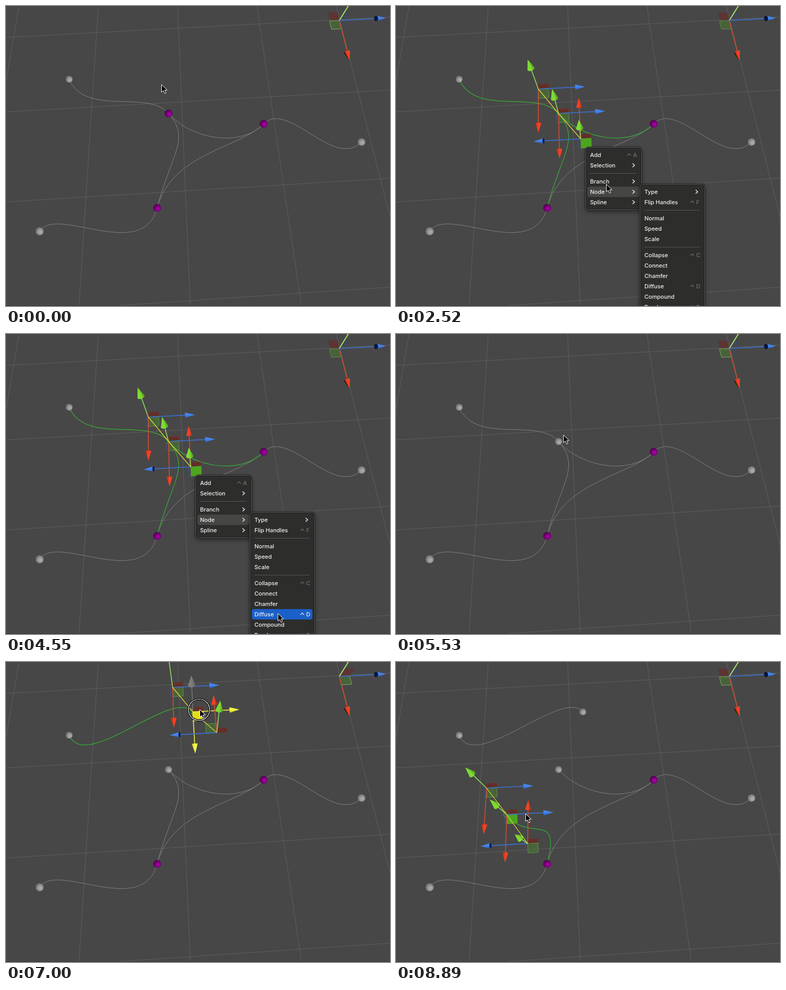
Recreate the animation shown at these times as an HTML page with a canvas. Size 742 by 578 pixels, loop 8960 ms.

```html
<!DOCTYPE html>
<html>
<head>
<meta charset="utf-8">
<style>
html, body { margin: 0; width: 100%; height: 100%; overflow: hidden; background: #474747; }
canvas { display: block; }
</style>
</head>
<body>
<canvas id="stage" width="742" height="578"></canvas>
<script>
const ctx = document.getElementById('stage').getContext('2d');
const LOOP = 8960;

// event times in ms
const SELECT = 770, MENU = 1050, SUBMENU = 2240, SPLIT = 4620;
const PICK1 = 5810, DRAG1 = 6300, STOP1 = 7000, DROP1 = 7070;
const PICK2 = 7630, DRAG2 = 7980, STOP2 = 8610, DROP2 = 8750;

// cursor stops: arrival time, x, y; a move takes at most GLIDE ms
const GLIDE = 490;
const STOPS = [
  [0, 300, 151], [210, 267, 151], [630, 367, 263], [1750, 406, 343], [3010, 500, 360],
  [3430, 530, 438], [3850, 526, 526], [4200, 525, 538], [5040, 374, 201], [5250, 341, 160],
  [5670, 317, 206], [6300, 327, 202], [6510, 333, 194], [STOP1, 374, 91],
  [7560, 317, 209], [7910, 319, 223], [STOP2, 219, 310], [8890, 250, 292]
];

// cone light, cone dark, line
const RED = ['#f64222', '#b32c14', '#cf4a30'];
const GREEN = ['#80da33', '#4f9a1b', '#8fd660'];
const BLUE = ['#4485ec', '#2a59b4', '#3b70d2'];
const YELLOW = ['#f6f645', '#c9c92a', '#ece83c'];
const FADED = ['#7d7d7d', '#616161', '#747474'];

const START = [122, 141], TAIL = [65, 434], END = [687, 262];
const JOINT = [314, 207], RIGHT = [498, 227], LOW = [292, 389];
const RIGHT_IN = [452, 274], LOW_UP = [320, 283];

const ITEMS = 'Add^A,Selection>,-,Branch>,Node>,Spline>';
const SUBITEMS = 'Type>,Flip Handles^F,-,Normal,Speed,Scale,-,Collapse^C,Connect,Chamfer,Diffuse^D,Compound,Break^B';

const add = (p, q) => [p[0] + q[0], p[1] + q[1]];
const mirror = (p, c) => [2 * c[0] - p[0], 2 * c[1] - p[1]];
const ease = u => u * u * (3 - 2 * u);

function cursorAt(t) {
  const i = STOPS.findIndex(s => s[0] > t);
  if (i < 0) return STOPS[STOPS.length - 1].slice(1);
  const [t0, x0, y0] = STOPS[i - 1], [t1, x1, y1] = STOPS[i];
  const time = Math.min(GLIDE, t1 - t0);
  const u = ease(Math.max(0, 1 - (t1 - t) / time));
  return [x0 + (x1 - x0) * u, y0 + (y1 - y0) * u];
}

function trace(points) {
  ctx.beginPath();
  points.forEach(p => ctx.lineTo(...p));
}

function outline(color, width = 1) {
  ctx.strokeStyle = color;
  ctx.lineWidth = width;
  ctx.stroke();
}

function stroke(points, color, width) {
  trace(points);
  outline(color, width);
}

function poly(points, fill, line) {
  trace(points);
  ctx.closePath();
  ctx.fillStyle = fill;
  ctx.fill();
  if (line) outline(line);
}

// four-sided patch spanned by two edges
const patch = (p, a, b, fill, line) => poly([p, add(p, a), add(add(p, a), b), add(p, b)], fill, line);

function curve(a, b, c, d, active) {
  ctx.beginPath();
  ctx.moveTo(...a);
  ctx.bezierCurveTo(...b, ...c, ...d);
  outline(active ? '#35b135' : '#878787', active ? 1.2 : 0.9);
}

function ball([x, y], r, light, dark) {
  const g = ctx.createRadialGradient(x + 1.5, y + 1.5, r * 0.3, x + 1, y + 1, r * 1.25);
  g.addColorStop(0, light);
  g.addColorStop(1, dark);
  ctx.beginPath();
  ctx.arc(x, y, r, 0, 7);
  ctx.fillStyle = g;
  ctx.fill();
}
const grayBall = (p, r = 6.6) => ball(p, r, '#a9a9a9', '#676767');
const purpleBall = p => ball(p, 7.5, '#a000a0', '#3c003c');

// axis line with a cone at its end; cap is the visible depth of its base
function arrow(p, v, [light, dark, line], half, cap = 0, capColor) {
  const len = Math.hypot(...v), base = len - Math.min(19, len * 0.45);
  ctx.save();
  ctx.translate(...p);
  ctx.rotate(Math.atan2(v[1], v[0]));
  stroke([[0, 0], [base, 0]], line, 1.7);
  const g = ctx.createLinearGradient(0, -half, 0, half), leftward = v[0] < -60;
  g.addColorStop(0, leftward ? dark : light);
  g.addColorStop(0.5, light);
  g.addColorStop(1, leftward ? light : dark);
  poly([[base, -half], [len, 0], [base, half]], g);
  ctx.beginPath();
  ctx.ellipse(base, 0, cap, half, 0, 0, 7);
  ctx.fillStyle = capColor || g;
  ctx.fill();
  ctx.restore();
}

// axes point along the camera's vanishing lines
function gizmo(p, { back, hot, held, flip }) {
  const [x, y] = p, sign = back ? -0.88 : 1;
  const up = [(x - 375) / 4.85, (y - 436) / 4.85];
  const down = [(x - 275) * 0.055 * sign, (84 + (y - 160) * 0.06) * sign];
  const side = back ? [-91, 5] : [90, -4.5];
  const across = flip ? [-21, 1] : [20, -1.5], depth = flip ? [-0.5, -18] : [0.7, 18];
  if (!flip) stroke([p, add(p, [-4, 0]), add(p, [-4, 17]), add(p, [0, 18])], '#3a5590');
  patch(p, [20, -1], [-0.5, -8.5], 'rgba(110,35,28,.7)', 'rgba(125,45,36,.8)');
  patch(p, across, depth,
    held ? '#e2de12' : hot ? '#4da51f' : 'rgba(76,130,50,.5)', held ? '#f0ec30' : '#5c9440');
  arrow(p, down, held ? YELLOW : RED, 5.8);
  arrow(p, side, held ? YELLOW : BLUE, 5.3, back ? 2 : 0, '#0d1c48');
  arrow(p, up, held ? FADED : GREEN, 7.2, 4);
}

function cornerGizmo(flip, dim) {
  const p = [644, 28], green = dim ? '#5f8a4c' : '#7dab63';
  if (!flip) stroke([p, [658, 16], [655, 40], p], '#2d4c8e');
  patch(p, flip ? [20, -1] : [-18, -1], flip ? [10, -15] : [-3, -15], 'rgba(105,45,40,.65)');
  patch(p, flip ? [20, -1] : [-19, 1], [4, 16], '#48623a', green);
  stroke([p, [662, -1]], '#a6e070', 2);
  poly([[653, 90], [659, 87], [663, 104]], '#140806');
  arrow(p, [20, 77], RED, 5.5);
  arrow(p, [90, -5], BLUE, 5.3, 4, '#0b1738');
}

// ground plane in perspective
function grid() {
  for (let k = 0; k < 5; k++) {
    const w = 1 - 0.0865 * k;
    stroke([[0, (60.5 + 125.9 * k) / w], [742, (21 + 126.7 * k) / w]], '#5e5e5e');
    stroke([[25 + 153.3 * k, 0], [215 * k - 74, 578]], '#5e5e5e');
  }
}

function menu(items, x, y, w, h, cursor, open) {
  ctx.save();
  ctx.shadowColor = 'rgba(0,0,0,.45)';
  ctx.shadowBlur = 10;
  ctx.shadowOffsetY = 4;
  ctx.beginPath();
  ctx.roundRect(x + 0.5, y + 0.5, w, h, 6);
  ctx.fillStyle = '#2d2e2c';
  ctx.fill();
  ctx.restore();
  outline('#191919', 3);
  outline('#676767');
  ctx.font = '500 11px Inter, sans-serif';

  const right = x + w, inside = cursor[0] > x + 3 && cursor[0] < right;
  let mid = y + 15;
  for (const item of items.split(',')) {
    if (item === '-') {
      stroke([[x + 9, mid - 4.5], [right - 9, mid - 4.5]], '#555');
      mid += 11;
      continue;
    }
    const [, label, mark, key] = item.match(/([\w ]+)([>^]?)(\w?)/);
    const hot = !open && inside && Math.abs(cursor[1] - mid + 0.5) < 10;
    if (hot || label === open) {
      ctx.beginPath();
      ctx.roundRect(x + 4, mid - 10, w - 8, 20, 4);
      ctx.fillStyle = hot ? '#1b60c8' : '#464645';
      ctx.fill();
    }
    ctx.fillStyle = '#f0f0f0';
    ctx.fillText(label, x + 9, mid + 4);
    if (mark === '>') {
      stroke([[right - 17, mid - 3.5], [right - 13, mid], [right - 17, mid + 3.5]], '#ececec', 1.5);
    } else if (mark) {
      const color = hot ? '#f0f0f0' : '#70706f';
      stroke([[right - 27, mid + 1], [right - 23.5, mid - 2.5], [right - 20, mid + 1]], color, 1.1);
      ctx.fillStyle = color;
      ctx.fillText(key, right - 16, mid + 4);
    }
    mid += 20;
  }
}

function pointer(p) {
  ctx.save();
  ctx.translate(...p);
  ctx.lineJoin = 'round';
  poly([[0.5, 0.5], [0.5, 15], [4, 12], [6.5, 17.5], [9, 16.5], [6.7, 11], [11.3, 11]], '#000', '#fff');
  ctx.restore();
}

function ring([x, y]) {
  ctx.beginPath();
  ctx.arc(x - 1, y + 1, 20.5, 0, 7);
  outline('#111', 4);
  outline('#eee', 1.2);
}

const handleIn = p => add(p, [-39, -47 - Math.max(0, p[1] - 207) * 0.046]);
const handleOut = p => add(p, [43 - (p[1] - 207) * 0.03, 49 + (p[1] - 207) * 0.08]);

function draw(t) {
  const within = (a, b) => t >= a && t < b;
  const cursor = cursorAt(t);
  const both = within(SELECT, SPLIT), first = within(PICK1, PICK2), second = t >= PICK2;
  const menuOn = within(MENU, SPLIT), subOn = within(SUBMENU, SPLIT);
  const held = within(DRAG1, DROP1) || within(DRAG2, DROP2);
  const n1 = t < DRAG1 ? JOINT : add(cursorAt(Math.min(t, STOP1)), [-13, 5]);
  const n2 = t < DRAG2 ? JOINT : add(cursorAt(Math.min(t, STOP2)), [-5, -16]);

  ctx.fillStyle = '#474747';
  ctx.fillRect(0, 0, 742, 578);
  grid();
  ctx.fillStyle = '#3a3034';
  ctx.fillRect(0, 577, 742, 1);

  curve(TAIL, [97, 383], mirror(LOW_UP, LOW), LOW);
  curve(LOW, LOW_UP, RIGHT_IN, RIGHT);
  curve(RIGHT, mirror(RIGHT_IN, RIGHT), [634, 316], END);
  curve(JOINT, handleOut(JOINT), RIGHT_IN, RIGHT, both);
  curve(START, [153, 214], handleIn(n1), n1, both || first);
  curve(n2, handleOut(n2), LOW_UP, LOW, both || second);

  grayBall(START);
  grayBall(TAIL, 7.8);
  grayBall(END, 7.3);
  purpleBall(RIGHT);
  purpleBall(LOW);
  if (t >= SPLIT) [JOINT, n1, n2].forEach(p => grayBall(p));
  else if (!both) purpleBall(JOINT);

  if (both || first || second) {
    const p = second ? n2 : first ? n1 : JOINT;
    const a = handleIn(p), b = handleOut(p);
    if (both || held || t >= DRAG2) ball(p, 5.5, '#2da51c', '#155c10');
    gizmo(a, {});
    gizmo(p, { held, hot: t > 7700 });
    gizmo(b, { back: true, hot: menuOn, flip: held });
    stroke([a, p, b], '#e9dc34', 1.2);
  }
  cornerGizmo(held, menuOn);

  if (menuOn) menu(ITEMS, 366, 272, 108, 120, cursor, subOn && 'Node');
  if (subOn) menu(SUBITEMS, 471, 343, 125, 260, cursor);
  if (held) ring(cursor);
  pointer(cursor);
}

const begin = performance.now();
function frame() {
  draw((performance.now() - begin) % LOOP);
  requestAnimationFrame(frame);
}
frame();
</script>
</body>
</html>
```
